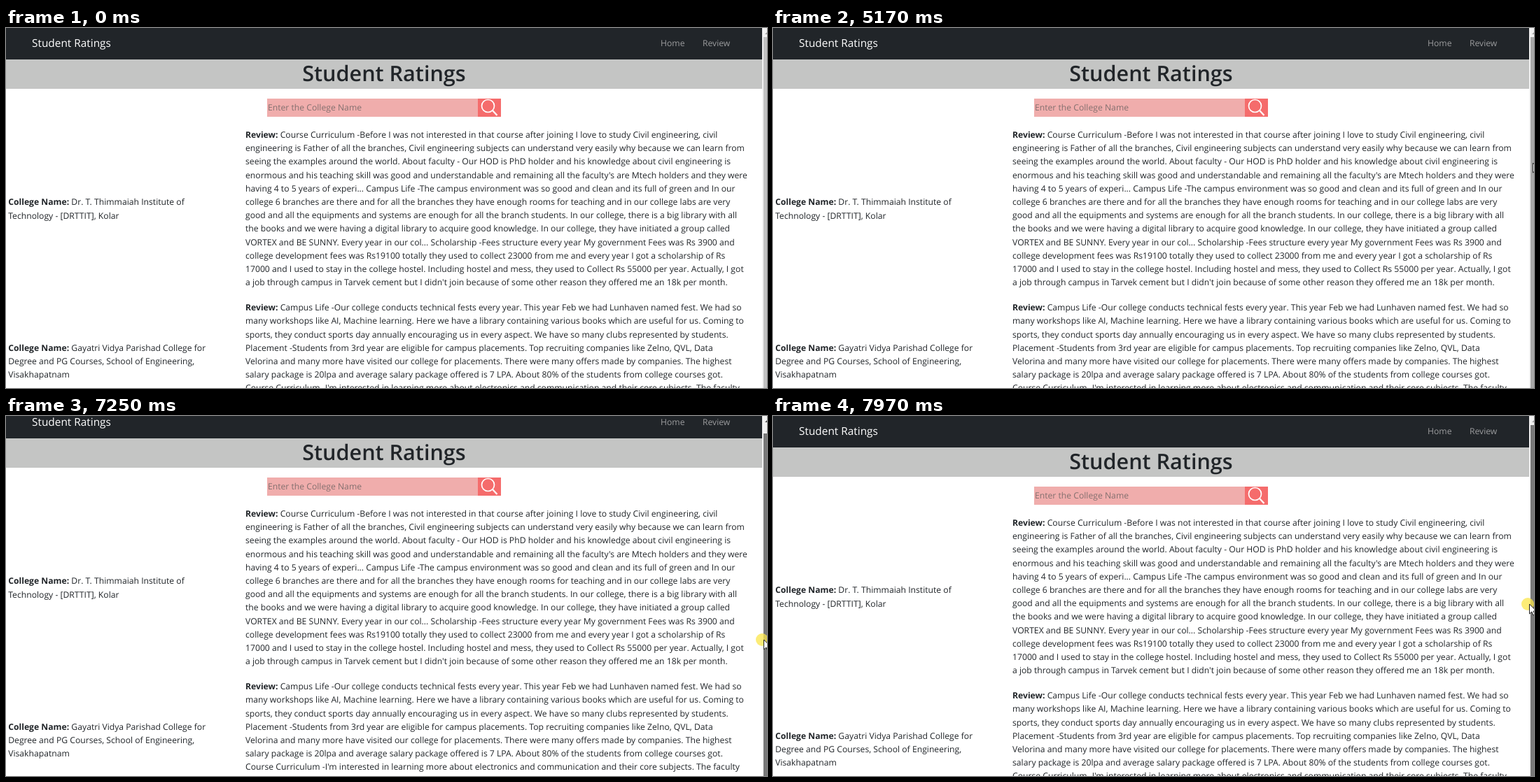
An HTML page for the animation above (8000 ms loop, 1087 px wide and 515 px high).

```html
<!DOCTYPE html>
<html lang="en">
<head>
<meta charset="utf-8">
<title>Student Ratings</title>
<style>
  html, body { margin: 0; width: 100%; height: 100%; overflow: hidden; background: #fff; }
  body {
    position: relative; color: #212529; white-space: pre;
    font: 12.18px/19.2px "Open Sans", "Noto Sans", sans-serif;
    text-rendering: geometricPrecision;
  }
  #page, #page > *, #bar, #bar > *, #overlay { position: absolute; }
  #page { left: 0; top: 0; width: 1080px; height: 600px; }
  nav { left: 0; top: 0; width: 1080px; height: 45px; background: #212529; color: #9b9c9e; line-height: 44px; }
  nav * { position: absolute; top: 0; }
  nav b { left: 37px; color: #fff; font-weight: 400; font-size: 15.4px; }
  h1 {
    left: 0; top: 45px; width: 1080px; height: 42px; margin: 0; background: #c4c5c4;
    font-size: 30.6px; font-weight: 600; line-height: 39px; text-align: center;
  }
  #search { left: 373px; top: 101px; width: 334px; height: 26px; background: #f0adac; color: #83706f; line-height: 26px; text-indent: 1px; }
  #search svg { position: absolute; left: 301px; top: 0; background: #f56c6c; }
  p { margin: 0; }
  .college { left: 3.2px; }
  .review { left: 342px; }
  #bar { left: 1080px; top: 0; width: 7px; height: 515px; background: #f1f1f1; overflow: hidden; }
  #thumb { left: 2px; width: 14px; height: 600px; }
  #arrow { left: 4px; top: 5px; border: 4px solid transparent; border-top: 0; border-bottom: 4px solid; }
  #overlay { left: 0; top: 0; }
</style>
</head>
<body>
<div id="page">
  <nav><b>Student Ratings</b><span style="left:935px">Home</span><span style="left:995px">Review</span></nav>
  <h1>Student Ratings</h1>
  <div id="search">Enter the College Name<svg width="33" height="26" fill="none" stroke="#fff"><circle cx="14.5" cy="10.5" r="9" stroke-width="1.7"/><path d="M21 17l6.5 7" stroke-width="2.3"/></svg></div>
<p class="college" style="top:239.3px"><b>College Name:</b> Dr. T. Thimmaiah Institute of
Technology - [DRTTIT], Kolar</p>
<p class="review" style="top:143px"><b>Review:</b> Course Curriculum -Before I was not interested in that course after joining I love to study Civil engineering, civil
engineering is Father of all the branches, Civil engineering subjects can understand very easily why because we can learn from
seeing the examples around the world. About faculty - Our HOD is PhD holder and his knowledge about civil engineering is
enormous and his teaching skill was good and understandable and remaining all the faculty's are Mtech holders and they were
having 4 to 5 years of experi... Campus Life -The campus environment was so good and clean and its full of green and In our
college 6 branches are there and for all the branches they have enough rooms for teaching and in our college labs are very
good and all the equipments and systems are enough for all the branch students. In our college, there is a big library with all
the books and we were having a digital library to acquire good knowledge. In our college, they have initiated a group called
VORTEX and BE SUNNY. Every year in our col... Scholarship -Fees structure every year My government Fees was Rs 3900 and
college development fees was Rs19100 totally they used to collect 23000 from me and every year I got a scholarship of Rs
17000 and I used to stay in the college hostel. Including hostel and mess, they used to Collect Rs 55000 per year. Actually, I got
a job through campus in Tarvek cement but I didn't join because of some other reason they offered me an 18k per month.</p>
<p class="college" style="top:448px"><b>College Name:</b> Gayatri Vidya Parishad College for
Degree and PG Courses, School of Engineering,
Visakhapatnam</p>
<p class="review" style="top:390.2px"><b>Review:</b> Campus Life -Our college conducts technical fests every year. This year Feb we had Lunhaven named fest. We had so
many workshops like AI, Machine learning. Here we have a library containing various books which are useful for us. Coming to
sports, they conduct sports day annually encouraging us in every aspect. We have so many clubs represented by students.
Placement -Students from 3rd year are eligible for campus placements. Top recruiting companies like Zelno, QVL, Data
Velorina and many more have visited our college for placements. There were many offers made by companies. The highest
salary package is 20lpa and average salary package offered is 7 LPA. About 80% of the students from college courses got.
Course Curriculum -I'm interested in learning more about electronics and communication and their core subjects. The faculty</p>
</div>
<div id="bar"><div id="arrow"></div><div id="thumb"></div></div>
<svg id="overlay" width="1087" height="515">
  <circle id="glow" r="9" opacity=".75"/>
  <path id="beam" d="M-3-6.5h2l1 1 1-1h2M0-5.5v11M-3 6.5h2l1-1 1 1h2" fill="none" stroke="#000"/>
  <path id="pointer" d="M0 0V14L3.3 11 5.5 16 7.8 15 5.6 10.2H10Z" fill="#fff" stroke="#222"/>
</svg>
<script>
const LOOP = 8000, PRESS = 7010;
const el = id => document.getElementById(id);

// Bursts of mouse movement: number of steps, then keys of time, x, y, scroll.
const bursts = [
  { steps: 5, keys: [[310, 778, 498, 0], [630, 762, 430, 0]] },
  { steps: 3, keys: [[890, 748, 408, 0], [1050, 704, 337, 0]] },
  { steps: 7, keys: [[3370, 710, 314, 0], [3830, 957, 183, 0]] },
  { steps: 10, keys: [[4100, 962, 184, 0], [4770, 1085, 196, 0]] },
  { steps: 11, keys: [[5170, 1085, 193, 0], [5940, 1085, 258, 0]] },
  { steps: 3, keys: [[6010, 1085, 262, 0], [6170, 1085, 279, 0]] },
  { steps: 11, keys: [[6930, 1085, 285, 0], [7100, 1083, 307, 0], [7180, 1082, 312, 1],
                      [7250, 1082, 320, 13], [7730, 1080, 291, 5]] },
  { steps: 3, keys: [[7800, 1080, 286, 4], [7880, 1080, 282, 2], [7970, 1080, 269, 0]] }
];

function poseAt(time) {
  const burst = bursts.filter(b => b.keys[0][0] <= time).pop();
  if (!burst) return null;
  const { keys, steps } = burst;
  const start = keys[0][0], end = keys[keys.length - 1][0];
  const tick = (end - start) / (steps - 1);
  // The small allowance keeps rounded step times on their own step.
  const t = Math.min(end, start + Math.floor((time - start + 12) / tick) * tick);
  const next = Math.max(1, keys.findIndex(k => k[0] >= t - 0.01));
  const a = keys[next - 1], b = keys[next];
  const part = (t - a[0]) / (b[0] - a[0]);
  return a.map((v, i) => v + (b[i] - v) * part).slice(1);
}

function place(node, visible, x, y) {
  node.style.display = visible ? "" : "none";
  node.setAttribute("transform", `translate(${x} ${y})`);
}

function draw(now) {
  const time = now % LOOP;
  const [x, y, offset] = poseAt(time) || [-50, -50, 0];
  const scroll = Math.round(offset);
  const pressed = time >= PRESS, overBar = x > 1079;

  el("page").style.top = -scroll + "px";
  el("thumb").style.top = 13 + Math.round(scroll * 0.9) + "px";
  el("thumb").style.background = pressed ? "#787878" : overBar ? "#a8a8a8" : "#c1c1c1";
  el("arrow").style.borderBottomColor = scroll ? "#505050" : "#a3a3a3";

  place(el("beam"), x < 1068, Math.round(x) + 0.5, Math.round(y));
  place(el("pointer"), x >= 1068, x + 0.5, y);
  place(el("glow"), pressed, x - 2, y);
  el("glow").setAttribute("fill", time > 7095 && time < 7250 ? "#f8b04a" : "#fbe64a");
  requestAnimationFrame(draw);
}
requestAnimationFrame(draw);
</script>
</body>
</html>
```
